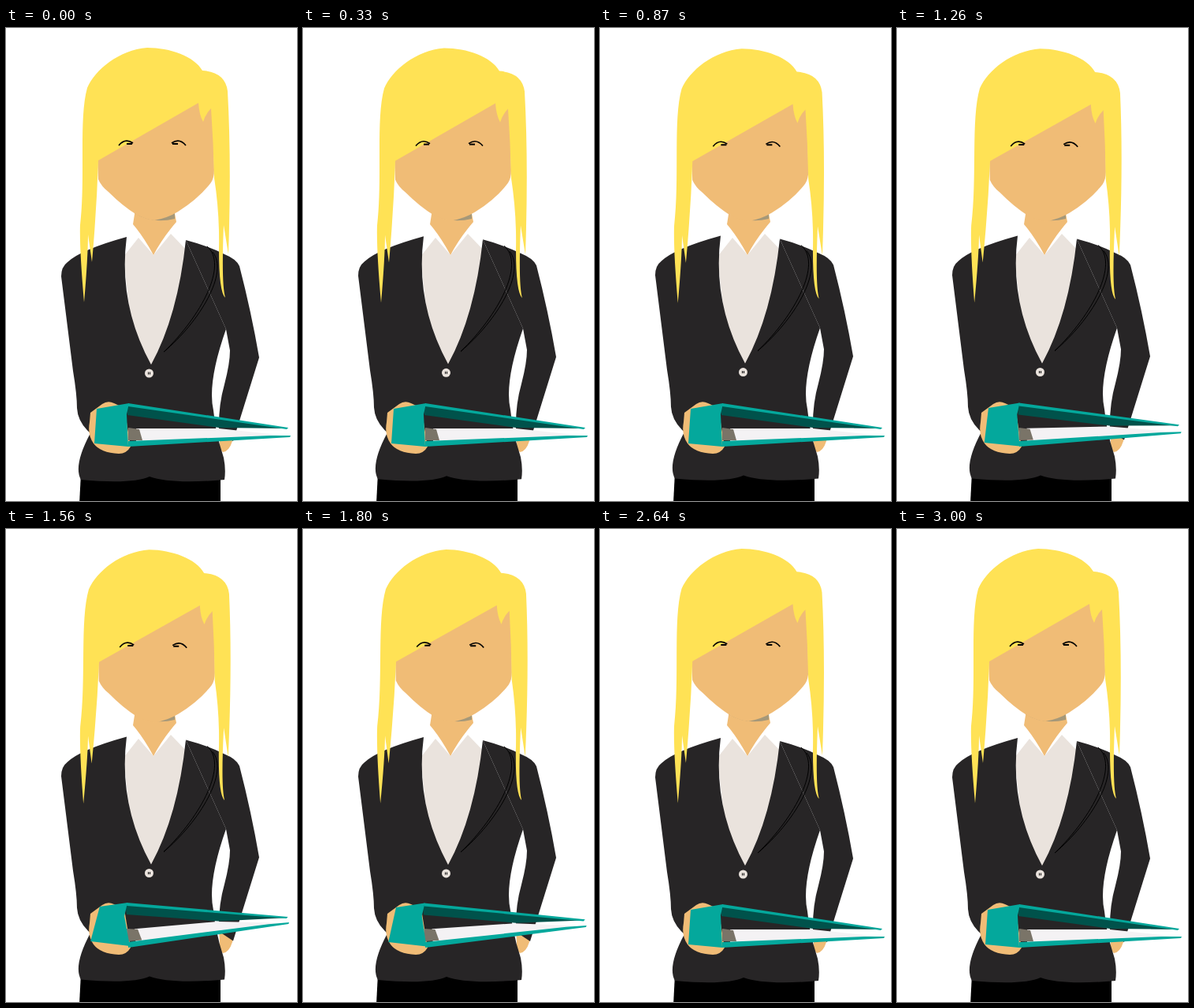
Recreate the animation shown at these times as an HTML page. Size 369 by 600 pixels, loop 3600 ms.

```html
<!DOCTYPE html>
<html lang="en">
<head>
<meta charset="utf-8">
<title>Woman with a binder</title>
<style>
html, body { margin: 0; width: 100%; height: 100%; overflow: hidden; background: #fff; }
svg { display: block; width: 369px; height: 600px; }
.skin { fill: #f0bc76; }
.suit { fill: #272526; }
.teal { fill: #04a89c; }
.line { fill: none; stroke: #000; }
</style>
</head>
<body>
<svg viewBox="0 0 369 600">
  <!-- shirt and neck -->
  <path fill="#eae3dd" d="M149 290 168 266 187 288 209 261 232 285 220 350 185 430 160 390Z"/>
  <path class="skin" d="M164 230 161 249Q174 264 187 288 198 267 216 246L213 230Z"/>
  <path fill="#a59879" d="M163 235 214 231V242Q186 249 163 235Z"/>

  <path class="skin" d="M270 510 290 512 287 524Q283 537 275 538 270 534 271 524Z"/>
  <g id="body">
    <path d="M95 565H272V604H93Z"/>
    <path class="suit" d="M153 265Q142 350 184 427 218 365 228 269L279 382Q255 450 263 485 266 515 276 545
      279 560 277 573 210 579 182 569 160 579 95 573 85 555 107 514 91 500 90 482 90 465 85 435
      L70 315Q70 303 78 297 95 281 153 265Z"/>
    <path class="suit" d="M228 269Q255 276 277 287 292 293 296 302 311 360 321 418L288 524 270 512
      Q269 480 277 452 284 425 284 409L279 382Z"/>
    <path class="line" d="M255 277C282 300 248 365 200 411 246 372 283 310 262 284"/>
    <circle cx="181.5" cy="438" r="5.5" fill="#eae3dd"/>
    <path class="line" stroke-width="3" stroke-dasharray="1 1" d="M180 438h3"/>
  </g>

  <g id="head">
    <path class="skin" d="M116 165 117 192Q121 201 130 208 148 226 166 237 178 243 188 244
      205 241 218 233 245 216 260 196 264 190 264 180L262 85 240 90Z"/>
    <path fill="#ffe255" d="M249 54C239 36 208 25 179 25 143 28 113 53 103 76 92 115 101 190 94 250
      Q93 280 99 348 104 290 104 262L109 297Q115 230 117 168L244 95Q245 110 250 119 253 109 260 102
      263 145 264 190 271 235 270 280 270 335 278 342 273 325 276 250L282 287Q286 170 281 80 278 56 249 54Z"/>
    <g id="eye" class="line">
      <path stroke-width="1.6" d="M143 149Q151 139 161 146"/>
      <path stroke-width="2" d="M153 147 160 147"/>
    </g>
    <use href="#eye" transform="matrix(-1 0 0 1 371 0)"/>
  </g>

  <path class="skin" d="M107 488 122 477Q129 472 137 476L150 482 158 531Q153 540 143 540 120 539 111 527 103 516 106 500Z"/>
  <!-- binder: two covers hinged on the spine -->
  <g id="top">
    <path fill="#00524b" d="M153 479 355 508 270 507 154 491Z"/>
    <path class="teal" d="M155 476 358 507 356 509 155 480Z"/>
  </g>
  <g id="bottom">
    <path fill="#f4f2f4" d="M165 508H270L335 515 355 518 165 525Z"/>
    <path fill="#7a7468" d="M155 507 169 509 173 523H155Z"/>
    <path class="teal" d="M155 524 335 517H361L360 519 155 531Z"/>
  </g>
  <path id="spine" class="teal"/>
</svg>
<script>
const $ = id => document.getElementById(id);
const pose = (id, transform) => $(id).setAttribute('transform', transform);

// Rises from 0 to 1 between two times and slows towards the end.
const ramp = (t, from, to) =>
  Math.sin(Math.PI / 2 * Math.min(1, Math.max(0, (t - from) / (to - from))));

function draw(now) {
  const t = Math.floor(now % 3600 / 30) * 30;
  const breath = ramp(t, 0, 1080) - ramp(t, 1620, 2700);
  const tilt = ramp(t, 780, 1260) - ramp(t, 2220, 3000);
  const lift = t > 1080 && t < 2160 ? Math.sin(Math.PI * (t / 1080 - 1)) ** 2 : 0;

  pose('body', `translate(0 ${-1.5 * breath})`);
  pose('head', `translate(0 ${1.3 * breath}) rotate(${0.6 * tilt} 180 265)`);
  pose('top', `translate(${-2 * lift} ${-2 * lift}) rotate(${-3.8 * lift} 155 478)`);
  pose('bottom', `rotate(${-5.2 * lift} 155 530)`);
  $('spine').setAttribute('d', `M${115 + 4 * lift} ${483 - 4 * lift}
    L${156 - 2 * lift} ${476 - 2 * lift} ${153 - 3 * lift} ${490 + lift}
    ${155 + 2 * lift} ${531 - 2 * lift} ${112 - 5 * lift} ${527 - 4 * lift}Z`);
}

const start = performance.now();
(function loop() {
  draw(performance.now() - start);
  requestAnimationFrame(loop);
})();
</script>
</body>
</html>
```
